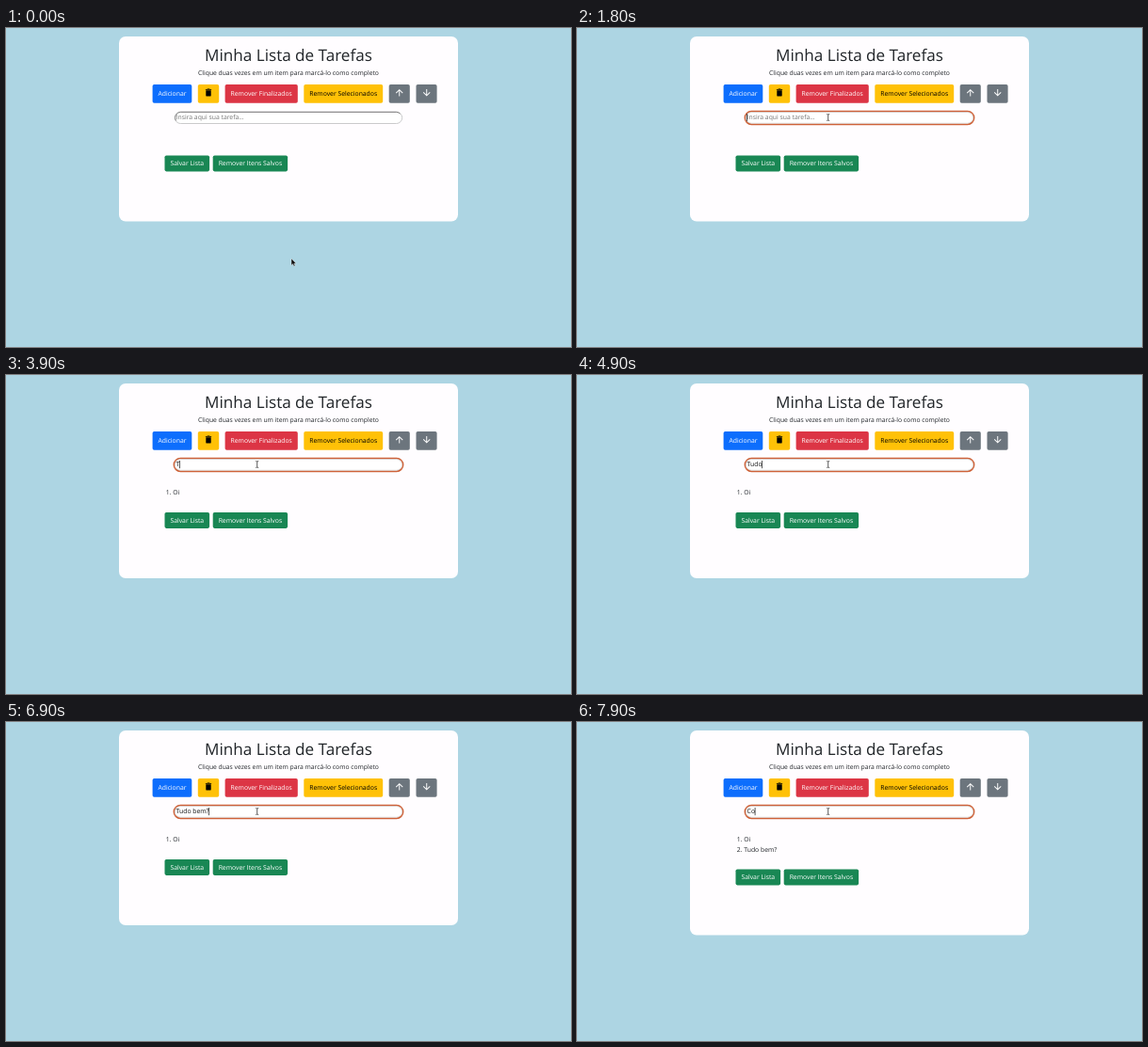
An HTML page for the animation above (8 s loop, 600 by 339 pixels).

```html
<!DOCTYPE html>
<html lang="pt-BR">
<head>
<meta charset="utf-8">
<title>Minha Lista de Tarefas</title>
<style>
  html, body { margin: 0; height: 100%; overflow: hidden; background: #add5e3; }
  svg { display: block; width: 100vw; height: 100vh; }
  text { font: 6.82px "Open Sans", "Noto Sans", sans-serif; fill: #212529; white-space: pre; text-rendering: geometricPrecision; }
  .mid { text-anchor: middle; }
  #title { font-size: 17.1px; font-weight: 500; }
  #hint { font-size: 6.75px; }
  #typed { fill: #111; }
</style>
</head>
<body>
<svg viewBox="0 0 600 339">
  <rect id="card" x="120" y="9" width="360" height="196.5" rx="7" fill="#fffdff"/>
  <text id="title" class="mid" x="300" y="34.8">Minha Lista de Tarefas</text>
  <text id="hint" class="mid" x="300" y="50.2">Clique duas vezes em um item para marcá-lo como completo</text>
  <g id="tools"></g>
  <path transform="translate(209.6 63.1) scale(.45)" d="M6 19c0 1.1.9 2 2 2h8c1.1 0 2-.9 2-2V7H6v12zM19 4h-3.5l-1-1h-5l-1 1H5v2h14V4z"/>
  <path id="up" fill="#fff" transform="translate(412 63) scale(.48)" d="M4 12l1.41 1.41L11 7.83V20h2V7.83l5.58 5.59L20 12l-8-8-8 8z"/>
  <use href="#up" transform="rotate(180 432.25 68.75)"/>

  <g id="idle" fill="#fff">
    <rect x="179.3" y="89.3" width="241.4" height="12.2" rx="6.1" stroke="#c4c4c6" stroke-width=".9"/>
    <path d="M180.5 98.5A6.1 6.1 0 0 1 185.4 89.3H414.6A6.1 6.1 0 0 1 418.5 91" fill="none" stroke="#767676" stroke-width=".9"/>
  </g>
  <g id="focused" fill="#fff">
    <rect x="178.3" y="88.4" width="243.4" height="14" rx="7" stroke="#cf6239" stroke-width="1.5"/>
    <rect x="179.4" y="89.5" width="241.2" height="11.8" rx="5.9" stroke="#b9aaa5" stroke-width=".5"/>
  </g>
  <text id="typed" x="180.6" y="97.4"></text>
  <text id="empty" x="180.6" y="97.4" style="fill:#757575">Insira aqui sua tarefa...</text>
  <rect id="caret" y="91" width=".7" height="8.2" fill="#111"/>

  <g id="list"></g>
  <g id="save"></g>

  <path id="arrow" d="M0 0V7.2L1.7 5.7 2.8 8.2 4 7.6 2.9 5.2H5.1Z" fill="#111" stroke="#fff" stroke-width=".4"/>
  <path id="beam" d="M-1.4-3.5Q0-3.5 0-2.6Q0-3.5 1.4-3.5M0-2.6V2.6M-1.4 3.5Q0 3.5 0 2.6Q0 3.5 1.4 3.5" fill="none" stroke="#333" stroke-width=".8"/>
</svg>
<script>
const $ = id => document.getElementById(id);
const show = (id, on) => $(id).style.display = on ? '' : 'none';

const button = (x, y, w, h, color, label = '', ink = '#fff') =>
  `<rect x="${x}" y="${y}" width="${w}" height="${h}" rx="1.8" fill="${color}"/>
   <text class="mid" x="${x + w / 2}" y="${y + h / 2 + 2.5}" style="fill:${ink}">${label}</text>`;

$('tools').innerHTML =
  button(155.6, 60, 41.7, 19.7, '#0d6efd', 'Adicionar') +
  button(203.8, 60, 22.4, 19.7, '#ffc107') +
  button(232.6, 60, 77.2, 19.7, '#dc3545', 'Remover Finalizados') +
  button(316.3, 60, 83.9, 19.7, '#ffc107', 'Remover Selecionados', '#000') +
  button(406.7, 60, 22.1, 19.7, '#6c757d') +
  button(435.5, 60, 22.1, 19.7, '#6c757d');
$('save').innerHTML =
  button(168.5, 135.4, 47.6, 17, '#198754', 'Salvar Lista') +
  button(219.7, 135.4, 79.4, 17, '#198754', 'Remover Itens Salvos');

const LOOP = 8000, FOCUS = 1800, ROW = 10.5;
// [time, key]
const keys = [
  [2300, 'O'], [2400, 'i'], [3100, 'Enter'],
  [3800, 'T'], [4200, 'u'], [4500, 'd'], [4800, 'o'], [5000, ' '],
  [5200, 'b'], [5500, 'e'], [6300, 'm'], [6700, '?'], [7100, 'Enter'],
  [7600, 'C'], [7800, 'o']
];
// [time, x, y]
const path = [[0, 303, 245], [400, 282, 228], [900, 253, 190], [1500, 266.7, 95]];

function pointer(t) {
  const i = path.findIndex(p => p[0] > t);
  if (i < 0) return path.at(-1).slice(1);
  const [t0, x0, y0] = path[i - 1], [t1, x1, y1] = path[i];
  const k = (t - t0) / (t1 - t0);
  return [x0 + (x1 - x0) * k, y0 + (y1 - y0) * k];
}

function draw(t) {
  let text = '', last = FOCUS;
  const items = [];
  for (const [at, key] of keys) {
    if (at > t) break;
    last = at;
    if (key === 'Enter') { items.push(text); text = ''; }
    else text += key;
  }
  const focus = t >= FOCUS;
  show('idle', !focus);
  show('focused', focus);
  show('empty', !text);
  $('typed').textContent = text;
  show('caret', focus && (t - last) % 1000 < 500);
  $('caret').setAttribute('x', 180.3 + (text ? $('typed').getComputedTextLength() : 0));

  $('list').innerHTML = items.map((item, i) =>
    `<text x="169.8" y="${127.1 + i * ROW}">${i + 1}.</text><text x="177.3" y="${127.1 + i * ROW}">${item}</text>`).join('');
  const grow = items.length * ROW;
  $('card').setAttribute('height', 196.5 + grow);
  $('save').setAttribute('transform', `translate(0 ${grow})`);

  const [x, y] = pointer(t), over = y < 102;
  show('arrow', !over);
  show('beam', over);
  $(over ? 'beam' : 'arrow').setAttribute('transform', `translate(${x} ${y})`);
}

const start = performance.now();
function tick() {
  const t = (performance.now() - start) % LOOP;
  draw(Math.floor(t / 100) * 100);
  requestAnimationFrame(tick);
}
tick();
</script>
</body>
</html>
```
